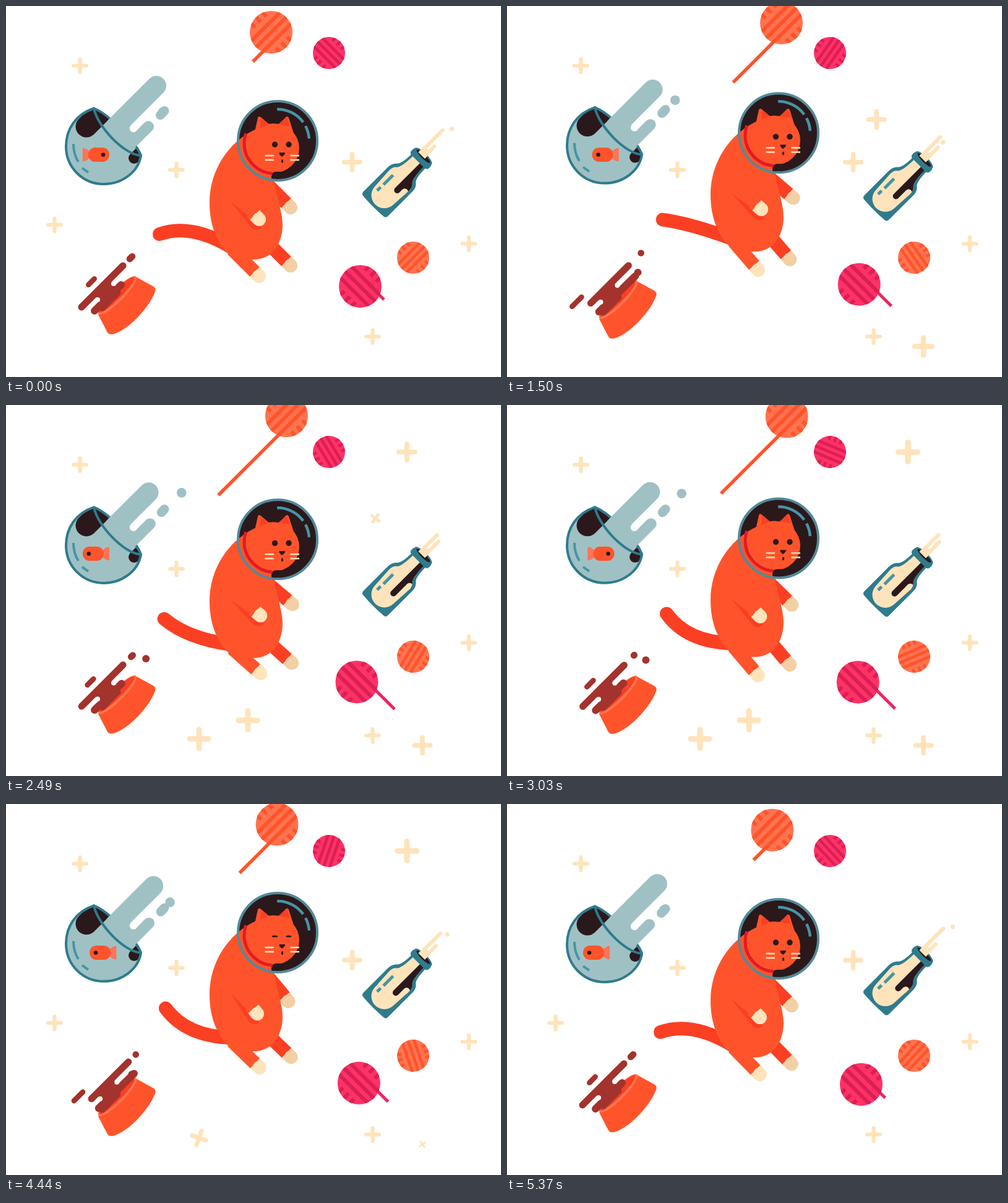
Write an HTML page with a canvas that moves like this. It is 800 px wide and 600 px high and loops after 5.4 s.

```html
<!DOCTYPE html>
<html lang="en">
<head>
<meta charset="utf-8">
<title>Cat in space</title>
<style>
html, body { margin: 0; width: 100%; height: 100%; overflow: hidden; background: #fff; }
canvas { display: block; }
</style>
</head>
<body>
<canvas id="stage" width="800" height="600"></canvas>
<script>
const g = document.getElementById('stage').getContext('2d');
const LOOP = 5400, TAU = Math.PI * 2, RAD = Math.PI / 180;
const ORANGE = '#ff542b', RED = '#fb3f23', CORAL = '#ff7350', CREAM = '#ffe3ba', TAN = '#f3cfa5',
  TEAL = '#2f7b8d', SHINE = '#4595a6', WATER = '#9fc1c4', DARK = '#2b181b', FOOD = '#a3332c',
  PINK = '#ff3266', ROSE = '#db1f55';

// [x, y, size, appears, gone]; the last two are left out when it always shows
const STARS = [
  [119.5, 96.5, 27], [275.5, 265, 27], [748, 384.5, 27],
  [78.5, 354, 27, 3600, 960], [559.5, 252.5, 33, 3575, 2043], [597, 183.5, 33, 300, 2600],
  [592.5, 534.5, 27, 837, 500], [312, 540, 39, 1800, 4602], [391, 510, 39, 1985, 3753],
  [673, 550.5, 33, 1300, 4508], [648, 76, 40, 2400, 5000]
];

const wave = u => (1 - Math.cos(Math.PI * u)) / 2;
const mix = (a, b, k) => a + (b - a) * k;
const clamp = v => Math.max(0, Math.min(1, v));
const bump = (t, centre, width) => Math.exp(-(((t - centre) / width) ** 2));

function at(x, y, angle, draw) {
  g.save();
  g.translate(x, y);
  g.rotate(angle * RAD);
  draw();
  g.restore();
}
function spin(x, y, angle, draw) {
  at(x, y, angle, () => { g.translate(-x, -y); draw(); });
}
function clipTo(path, draw) {
  g.save();
  g.clip(path);
  draw();
  g.restore();
}
function fill(color, path) {
  g.fillStyle = color;
  g.fill(typeof path === 'string' ? new Path2D(path) : path);
}
function stroke(color, width, path, cap = 'round') {
  g.strokeStyle = color;
  g.lineWidth = width;
  g.lineCap = cap;
  g.lineJoin = 'round';
  g.stroke(typeof path === 'string' ? new Path2D(path) : path);
}
function seg(color, width, x1, y1, x2, y2, cap) {
  stroke(color, width, `M${x1} ${y1}L${x2} ${y2}`, cap);
}
function oval(color, x, y, rx, ry = rx, angle = 0) {
  g.beginPath();
  g.ellipse(x, y, rx, ry, angle * RAD, 0, TAU);
  g.fillStyle = color;
  g.fill();
}
function arc(color, width, x, y, r, from, to) {
  g.beginPath();
  g.arc(x, y, r, from * RAD, to * RAD);
  g.strokeStyle = color;
  g.lineWidth = width;
  g.lineCap = 'butt';
  g.stroke();
}
function circlePath(x, y, r) {
  const p = new Path2D();
  p.arc(x, y, r, 0, TAU);
  return p;
}

function star([x, y, size, on, off], t) {
  let scale = 1, angle = 0;
  if (on !== undefined) {
    const age = (t - on + LOOP) % LOOP, left = (off - on + LOOP) % LOOP - age;
    if (left <= 0) return;
    const u = clamp(age / 350) - 1, v = clamp(1 - left / 300);
    scale = (1 + 2.7 * u ** 3 + 1.7 * u * u) * (1 - v * v);
    angle = 90 * v * v;
  }
  if (scale <= 0.02) return;
  at(x, y, angle, () => {
    const s = size * scale, w = s * 0.23, h = s / 2 - w / 2;
    seg(CREAM, w, -h, 0, h, 0);
    seg(CREAM, w, 0, -h, 0, h);
    oval(CREAM, 0, 0, s * 0.18);
  });
}

function yarn(x, y, r, angle, color, dark) {
  at(x, y, angle, () => {
    oval(color, 0, 0, r);
    clipTo(circlePath(0, 0, r), () => {
      const w = r * 0.18;
      for (const k of [-0.37, 0, 0.37]) {
        seg(dark, w, -r, k * r, r, k * r, 'butt');
        for (const side of [-1, 1]) seg(dark, w, k * r, side * r * 0.68, k * r, side * r, 'butt');
      }
    });
  });
}

function yarns(t, u) {
  const turn = 360 * t / LOOP;
  let a = 27 * u, b = 60.5 * u;
  seg(ORANGE, 5.5, 399 - b, 90 + b, 425 + a, 64 - a, 'butt');
  yarn(428.5 + a, 42.5 - a, 34.5, -45, CORAL, ORANGE);
  a = 6 * u;
  b = 18.5 * u;
  seg('#e8285f', 5, 611 + b, 475 + b, 590 - a, 454 - a, 'butt');
  yarn(572.5 - a, 453.5 - a, 34.5, 45, PINK, ROSE);
  yarn(522, 76, 26, 45 - turn, PINK, ROSE);
  yarn(658, 407, 26, turn - 45, CORAL, ORANGE);
}

const BOWL = new Path2D('M142 165.5C113 175 97 199 97 227C97 261 124 288 158 288C188 288 214 268 218 242C213 224 167 175 142 165.5Z');

function fish(t) {
  const k = t % 2700 / 1350, right = k < 1;
  const dx = 15 * (right ? 1 - (1 - k) ** 2 : wave(k));
  at(145 + dx, 240.5, 0, () => {
    g.scale(right ? 1 : -1, 1);
    fill('#ff7358', 'M-20 -11Q-14 -10 -9 -4L-9 4Q-14 10 -20 11Q-22 11 -21 0Q-22 -11 -20 -11Z');
    const body = new Path2D();
    body.roundRect(-12, -11.5, 34, 23, 11);
    fill(ORANGE, body);
    oval(DARK, 12, 0, 3.3);
  });
}

function fishbowl(t, u, s) {
  at(0, -1.5 * s, 0, () => {
    fill(WATER, BOWL);
    clipTo(BOWL, () => {
      seg(DARK, 35, 130, 195, 170, 155);
      seg(DARK, 18, 207, 246, 230, 223);
    });
    stroke(TEAL, 4, BOWL);
    const a = 13.5 * u, b = 3 * u;
    seg(WATER, 32, 243 - a, 129 + a, 176, 196);
    seg(WATER, 18, 230 + b, 195 - b, 200, 225);
    seg(WATER, 22, 206, 198, 185, 219, 'butt');
    oval('#fff', 206, 198, 6.2);
    seg(WATER, 15, 249.5 + 2 * u, 176.5 - 3 * u, 256, 169.5 - u);
    oval(WATER, 253.3 + 33 * u, 171.5 - 32 * u, 7.8);
    stroke(TEAL, 4, 'M142 165.5C148 195 190 240 218 242');
    stroke(SHINE, 4, 'M109 223Q109 240 117 252M123 262Q128 266 133 269', 'butt');
  });
  fish(t);
}

const BOTTLE = new Path2D('M4 -28L60 -28Q70 -28 75 -21.5Q80 -16 104 -16L104 16Q80 16 75 21Q70 28 60 28L4 28Q0 28 -1 24Q-3 0 -1 -24Q0 -28 4 -28Z');
const MILK = new Path2D('M24 -21L58 -23Q67 -23 71 -17Q78 -12 106 -12L106 12Q78 12 71 17Q66 23 58 23L24 21A21 21 0 0 1 24 -21Z');

function bottle(u, s) {
  at(594.5, 323 + 6 * s, -45, () => {
    fill(TEAL, BOTTLE);
    fill(CREAM, MILK);
    clipTo(MILK, () => {
      const lobe = 51 + 12 * u;
      seg(DARK, 10, 44.5 - 9.5 * u, 9, 120, 9);
      seg(DARK, 22, lobe, 20, 120, 20, 'butt');
      oval(CREAM, lobe, 19.5, 5.5);
    });
    seg(SHINE, 5, 35, -13, 57, -13, 'butt');
    seg(SHINE, 5, 21, -13.5, 29, -13.5, 'butt');
    const ring = new Path2D();
    ring.roundRect(101, -20, 13, 40, 5);
    fill(TEAL, ring);
    oval(TEAL, 113, 0, 6, 19);
    oval(DARK, 113, 0, 3.5, 15);
    seg(CREAM, 15, 112, -3, 126, -3, 'butt');
    seg(CREAM, 6, 122, -7.8, 164.8 - 13.4 * u, -7.8);
    seg(CREAM, 6, 122, 1.4, 137 + 10.6 * u, 1.4);
    oval(CREAM, 177 - 38 * wave(u), 1.2, 3.5);
  });
}

function dish(u, s) {
  at(0, 7.3 * s, 0, () => {
    fill(ORANGE, 'M210 438L239 454Q243 457 241 462C230 492 190 530 170 531Q166 531 164 528L149 499Z');
    oval(CORAL, 180, 468, 43, 10, -45);
    oval(RED, 179, 467, 40, 7, -45);
    const d = s * (1 - u), top = 17 * d, low = 31 * d, lobe = 33 * s * (1 - 0.6 * u), hang = 13 * d;
    seg(FOOD, 9, 156, 489, 181, 464);
    seg(FOOD, 11, 122 + low, 487 - low, 189 + top, 420 - top);
    seg(FOOD, 12, 143 + hang, 493 - hang, 186 + lobe, 451 - lobe);
    const p = 8 * d, q = 10 * d;
    seg(FOOD, 14, 148 + p, 475 - p, 174 + q, 449 - q, 'butt');
    oval('#fff', 148 + p, 475 - p, 4);
    oval('#fff', 174 + q, 449 - q, 4);
    const a = 26 * s, half = 4.7 + 3 * s;
    seg(FOOD, 8.5, 138 - a - half, 446 + a + half, 138 - a + half, 446 + a - half);
    const b = 27 * s * u, c = 40 * (u - 0.656), long = 2 * (1 - clamp(b / 4));
    seg(FOOD, 10.6, 202 + b - long, 407 - b + long, 202 + b + long, 407 - b - long + 0.01);
    if (u > 0.3) oval(FOOD, 215.5 + c, 420 - 0.95 * c, 6);
  });
}

function limb(color, pawColor, x1, y1, x2, y2) {
  seg(color, 22, x1, y1, x2, y2, 'butt');
  seg(pawColor, 22, x2, y2, x2 + 7, y2 + 7, 'butt');
  oval(pawColor, x2 + 7, y2 + 7, 11);
}

const BODY = new Path2D('M402 200C360 220 329 265 329 318C329 355 341 382 358 400C374 409 388 410 400 410C432 410 447 382 447 354C447 335 438 310 433 283L432 200Z');
const GLASS = circlePath(439, 218, 64);

function head(t) {
  fill(DARK, GLASS);
  clipTo(GLASS, () => {
    fill(ORANGE, BODY);
    fill(ORANGE, 'M400 212L407 181Q408 177 412 180L425 191L441 191L452 180Q455 177 457 181L465 206Z');
    oval(ORANGE, 432, 230, 42, 40);
    fill(RED, 'M412 182L411 197L425 191ZM454 180L440 191L459 194Z');
    const shade = new Path2D();
    shade.roundRect(429, 268, 90, 40, 7);
    fill(DARK, shade);
    arc('#e31b23', 5, 434, 222, 49, 94, 199);
  });
  const open = clamp((Math.abs(t % 2700 - 1840) - 100) / 140);
  for (const x of [434.5, 457]) oval(DARK, x, 224, 4.7, Math.max(1.5, 4.7 * open));
  fill(DARK, 'M442 237L451 237Q452 239 447 243Q446 244 445 243Q440 239 442 237Z');
  seg(DARK, 3, 446.5, 248.5, 446.5, 253.5, 'butt');
  for (const x of [418.5, 459.5])
    for (const y of [242, 249]) seg(CREAM, 2.5, x, y, x + 14.5, y, 'butt');
  arc(SHINE, 4.5, 439, 218, 51, -91, -36);
  arc(SHINE, 4.5, 439, 218, 51, -28, -4);
  stroke('#528a98', 4, GLASS);
}

function cat(t) {
  const m = t % 2700;
  const lift = 14 * (m < 1200 ? wave(m / 1200) : wave(1 - (m - 1200) / 1500));
  const leg = -5 * Math.sin(TAU * t / 1800);
  const arm = -9 * bump(t, 2010, 600) + 5.5 * bump(t, 4440, 500);
  const tail = wave(wave(t / 337.5));
  at(0, -lift, 0, () => {
    stroke(RED, 22, `M${mix(248, 258, tail)} ${mix(369, 340, tail)}Q${mix(298, 291, tail)} ${mix(351, 386, tail)} ${mix(362, 364, tail)} ${mix(389, 388, tail)}`);
    spin(425, 385, leg, () => limb(RED, TAN, 424, 384, 453, 413));
    spin(425, 290, arm, () => limb(RED, TAN, 424, 290, 453, 319));
    fill(ORANGE, BODY);
    spin(372, 398, leg, () => limb(ORANGE, CREAM, 366, 394, 402, 430));
    spin(364, 316, arm, () => {
      fill(RED, 'M362 315L396 358Q404 366 414 359L396 343Z');
      limb(ORANGE, CREAM, 397, 333, 402, 338);
    });
    head(t);
  });
}

function frame(now) {
  const t = now % LOOP;
  const u = 1 - Math.abs(1 - t / 2700);
  const s = wave(t / 1350);
  g.fillStyle = '#fff';
  g.fillRect(0, 0, 800, 600);
  STARS.forEach(item => star(item, t));
  yarns(t, u);
  fishbowl(t, u, s);
  bottle(u, s);
  dish(u, s);
  cat(t);
}

const start = performance.now();
function tick() {
  frame(performance.now() - start);
  requestAnimationFrame(tick);
}
tick();
</script>
</body>
</html>
```
